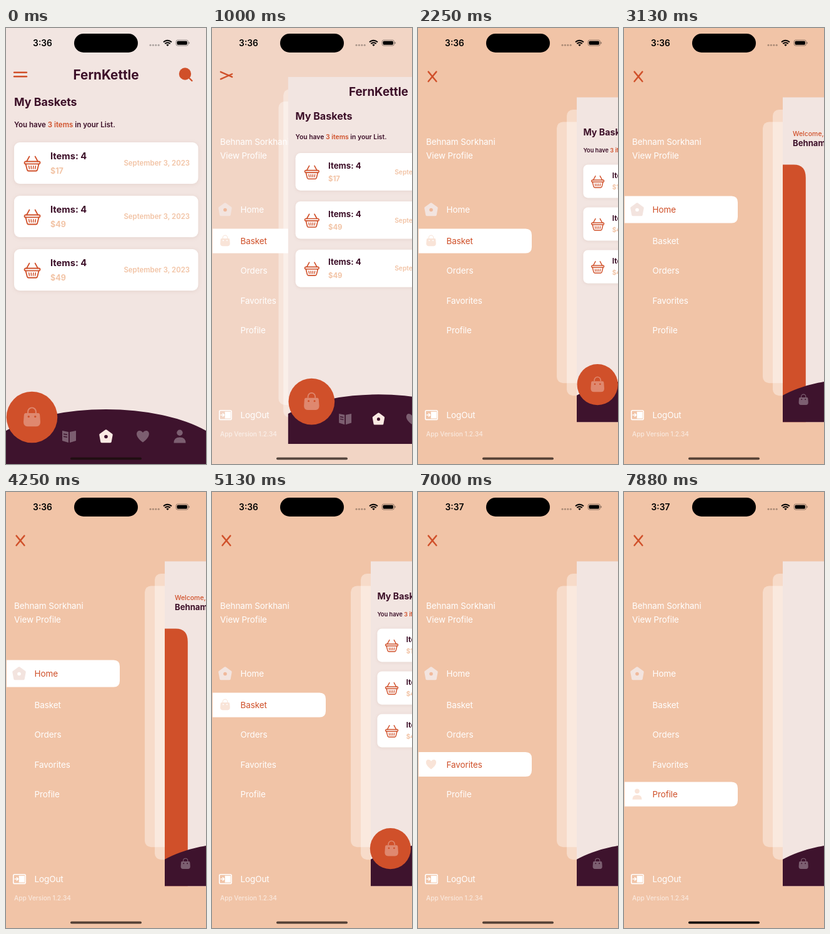
These frames come from a looping animation (320 by 694 pixels, 8000 ms). An HTML page:

```html
<!DOCTYPE html>
<html lang="en">
<head>
<meta charset="utf-8">
<title>Coffee app drawer</title>
<style>
html, body { margin: 0; height: 100%; overflow: hidden; background: #f2e5e1; }
svg { display: block; width: 100vw; height: 100vh; font-family: Inter, "Open Sans", sans-serif; }
.bold { font-weight: 700; fill: #3c0f28; }
.semi { font-weight: 600; fill: #3c0f28; }
.orange { fill: #d0502a; }
.peach { fill: #f2c4a6; }
.menu text { font-size: 13.5px; letter-spacing: -.1px; fill: #fff; }
.card { fill: #fff; filter: drop-shadow(0 1px 3px rgba(120, 60, 40, .1)); }
.line { fill: none; stroke: #d0502a; stroke-linecap: round; stroke-linejoin: round; }
</style>
</head>
<body>
<svg viewBox="0 0 320 694">
  <defs>
    <g id="bag">
      <path fill-rule="evenodd" d="M-7-5H7Q9-5 9-2L9.5 5Q9.5 10 5 10H-5Q-9.5 10-9.5 5L-9-2Q-9-5-7-5ZM-4.9-1a1.2 1.2 0 1 0 2.4 0a1.2 1.2 0 1 0-2.4 0M2.5-1a1.2 1.2 0 1 0 2.4 0a1.2 1.2 0 1 0-2.4 0"/>
      <path d="M-4.5-5V-6.5a4.5 4.5 0 0 1 9 0V-5" fill="none" stroke="currentColor" stroke-width="1.4"/>
    </g>
    <path id="book" fill-rule="evenodd" d="M-11-9L-1-7V10L-11 7ZM-9-4.5l6 1v1.5l-6-1zM-9-.5l6 1v1.5l-6-1zM1-7L11-9V7L1 10Z"/>
    <path id="home" d="M0-9L9-2.5L7 8.5H-7L-9-2.5Z" stroke="currentColor" stroke-width="3.5" stroke-linejoin="round"/>
    <path id="heart" d="M0 9.5C-14 0-10.5-9-5.5-9Q-2-9 0-6Q2-9 5.5-9C10.5-9 14 0 0 9.5Z"/>
    <g id="person"><circle cy="-5.8" r="4.7"/><path d="M-9.5 10.5Q-9.5 1.5 0 1.5T9.5 10.5Z"/></g>
    <g id="basket" class="line" stroke-width="1.8">
      <rect x="-12.5" y="-3" width="25" height="3.8" rx="1.9"/>
      <path d="M-10.5 1L-8.2 10Q-7.7 12-6 12H6Q7.7 12 8.2 10L10.5 1M-9-3L-4.6-11M9-3L4.6-11"/>
      <path d="M-5.4 4.2L-4.6 8.6M-1.8 4.2L-1.5 8.6M1.8 4.2L1.5 8.6M5.4 4.2L4.6 8.6" stroke-width="1.5"/>
    </g>
  </defs>

  <rect id="back" width="320" height="694"/>

  <g class="menu">
    <text x="13" y="185.5">Behnam Sorkhani</text>
    <text x="13" y="208">View Profile</text>
    <path id="mark" fill="#fff"/>
    <g id="rows"></g>
    <g fill="none" stroke="#fff" stroke-width="1.6">
      <rect x="11.8" y="608.8" width="19.4" height="14.6" rx="2"/>
      <path d="M13.5 616H19M16.7 613.2L19.5 616L16.7 618.8" stroke-width="1.4"/>
      <path d="M21.5 611.5h7.5v9.2h-7.5z" fill="#fff"/>
    </g>
    <text x="45.5" y="621">LogOut</text>
    <text x="13" y="650" style="font-size:10.1px;font-weight:500;letter-spacing:0" opacity=".62">App Version 1.2.34</text>
  </g>

  <rect id="layer2" rx="10" width="360" fill="#fff" opacity=".38"/>
  <rect id="layer1" rx="10" width="360" fill="#fff" opacity=".38"/>

  <g id="page">
    <rect y="48" width="320" height="646" fill="#f2e5e1"/>
    <g id="basketPage">
      <text class="bold" x="160" y="81.5" font-size="20.8" text-anchor="middle">FernKettle</text>
      <circle class="orange" cx="286.5" cy="73" r="9.7"/>
      <path class="line" d="M293.5 80L297.5 84" stroke-width="2.4"/>
      <text class="bold" x="13" y="123.5" font-size="17.8">My Baskets</text>
      <text class="semi" x="13" y="157.5" font-size="11.5">You have <tspan class="orange">3 items</tspan> in your List.</text>
      <g id="cards"></g>
    </g>
    <g id="homePage">
      <text class="orange" x="20" y="125" font-size="13.1" font-weight="500">Welcome,</text>
      <text class="bold" x="20" y="144.5" font-size="16.4">Behnam</text>
      <path class="orange" d="M0 182H22Q46 182 46 208V694H0Z"/>
    </g>
    <path d="M0 641A200 85 0 0 1 320 641V694H0Z" fill="#3e132d"/>
    <circle id="ball" class="orange" cy="619.5" r="40.8"/>
    <g id="nav"></g>
  </g>

  <g class="line" stroke-width="2.4" stroke-linecap="butt">
    <path id="bar1" d="M-10 0H10"/>
    <path id="bar2" d="M-10 0H10"/>
  </g>

  <text id="clock" x="58.5" y="29" font-size="13.8" font-weight="600" text-anchor="middle"></text>
  <rect x="109" y="9" width="102" height="30" rx="15"/>
  <g fill="#000" fill-opacity=".3">
    <circle cx="231" cy="27.3" r="1.5"/><circle cx="235.4" cy="27.3" r="1.5"/>
    <circle cx="239.8" cy="27.3" r="1.5"/><circle cx="244.2" cy="27.3" r="1.5"/>
  </g>
  <g fill="none" stroke="#000" stroke-width="2">
    <path d="M252 22.6Q258.5 16.8 265 22.6M254.3 25Q258.5 21.4 262.7 25"/>
    <path d="M258.5 29L256.3 26.7Q258.5 25 260.7 26.7Z" fill="#000" stroke="none"/>
    <rect x="272" y="19.2" width="19.5" height="9" rx="2.8" stroke-width="1" stroke-opacity=".4"/>
    <rect x="273.5" y="20.7" width="16.5" height="6" rx="1.6" fill="#000" stroke="none"/>
    <path d="M293 22.3V25.2" stroke-width="1.2" stroke-opacity=".5"/>
  </g>
  <rect id="grip" x="103" y="683.6" width="114" height="3.6" rx="1.8"/>
</svg>
<script>
const $ = id => document.getElementById(id);
const set = (id, attrs) => {
  for (const k in attrs) $(id).setAttribute(k, attrs[k]);
};
const show = (id, on) => set(id, { visibility: on ? 'visible' : 'hidden' });
const clamp = v => Math.min(1, Math.max(0, v));
const mix = (a, b, p) => a + (b - a) * p;

const LOOP = 8000, OPEN = 880;
// name, icon, menu y, row half height, bar x, menu icon scale
const items = [
  ['Home', 'home', 289, 21.5, 160, 1],
  ['Basket', 'bag', 339, 19.5, 41.5, .82],
  ['Orders', 'book', 386, 19.5, 101, .8],
  ['Favorites', 'heart', 433.5, 19.5, 219, .82],
  ['Profile', 'person', 481, 19.5, 278, .8],
];
// start time, selected item
const taps = [[-9e3, 1], [2750, 0], [4750, 1], [5630, 2], [6630, 3], [7500, 4]];

$('rows').innerHTML = items.map(([name, icon, y, , , size], i) =>
  `<g id="icon${i}" transform="translate(21 ${y}) scale(${size})" fill="#f9e4d8" color="#f9e4d8">
    <use href="#${icon}"/></g>
  <text id="label${i}" x="45.5" y="${y + 5}">${name}</text>`).join('') +
  '<circle id="dot" cx="21" cy="289.5" r="2.8"/>';
set('icon0', { fill: '#f3e4df', color: '#f3e4df' });

$('cards').innerHTML = [17, 49, 49].map((price, i) =>
  `<g transform="translate(0 ${85 * i})">
    <rect class="card" x="13" y="182" width="294.5" height="66" rx="9"/>
    <use href="#basket" x="42" y="215.5"/>
    <text class="bold" x="71" y="209.3" font-size="14.7">Items: 4</text>
    <text class="bold peach" x="71" y="231.5" font-size="12.5">$${price}</text>
    <text class="semi peach" x="294" y="219.3" font-size="11.4" text-anchor="end">September 3, 2023</text>
  </g>`).join('');

$('nav').innerHTML = items.map(([, icon], i) =>
  `<g id="nav${i}" fill="#fff" color="#fff" opacity="${i ? .32 : 1}"><use href="#${icon}"/></g>`).join('');
set('nav0', { fill: '#fbeae3', color: '#fbeae3' });
$('nav0').innerHTML += '<circle cy=".5" r="2.8" fill="#3e132d"/>';

function drawDrawer(p) {
  const x = 254 * p, y = 72 * p, s = 1 - .2 * p;
  const top = y + 48 * s, bottom = y + 694 * s;
  set('page', { transform: `translate(${x} ${y}) scale(${s})` });
  for (const k of [1, 2]) {
    const ly = top + 19.5 * k;
    set('layer' + k, { x: x - 16 * k * p, y: ly, height: bottom - 22 - 20 * k - ly });
  }
  const tint = [[242, 241], [229, 196], [225, 167]].map(([a, b]) => mix(a, b, p));
  set('back', { fill: `rgb(${tint})` });
  set('bar1', { transform: `translate(23 ${mix(70.7, 77.3, p)}) rotate(${50 * p})` });
  set('bar2', { transform: `translate(23 ${mix(77.3, 77.3, p)}) rotate(${-50 * p})` });
}

function drawSelection(t) {
  const n = taps.findLastIndex(tap => t >= tap[0]);
  const [start, now] = taps[n];
  const before = taps[Math.max(0, n - 1)][1];

  const [, , y, half] = items[now];
  set('mark', { d: `M1 ${y - half}H172q10 0 10 10V${y + half - 10}q0 10-10 10H1Z` });
  set('dot', { fill: now ? '#f0b99b' : '#fff' });
  items.forEach((_, i) => {
    $('label' + i).style.fill = i === now ? '#cf4f28' : '#fff';
    show('icon' + i, !i || i === now);
  });
  show('basketPage', now === 1);
  show('homePage', now === 0);

  // the ball overshoots its place a little, icons just rise and sink
  const u = clamp((t - start) / 430), v = u - 1;
  const back = 1 + 2.7 * v ** 3 + 1.7 * v ** 2;
  const ease = 1 + v ** 3;
  set('ball', { cx: mix(items[before][4], items[now][4], back) });
  items.forEach((item, i) => {
    const lift = i === now ? (now === before ? 1 : ease) : i === before ? 1 - ease : 0;
    set('nav' + i, { transform: `translate(${item[4]} ${650 - 30 * lift}) scale(${1 + .42 * lift})` });
  });
}

function frame(ms) {
  const t = ms % LOOP;
  drawDrawer(Math.sin(clamp((t - OPEN) / 380) * Math.PI / 2));
  drawSelection(t);
  $('clock').textContent = t < 5630 ? '3:36' : '3:37';
  set('grip', { fill: '#140c08', 'fill-opacity': t < 7500 ? .7 : 1 });
  requestAnimationFrame(now => frame(now - begin));
}
const begin = performance.now();
frame(0);
</script>
</body>
</html>
```
